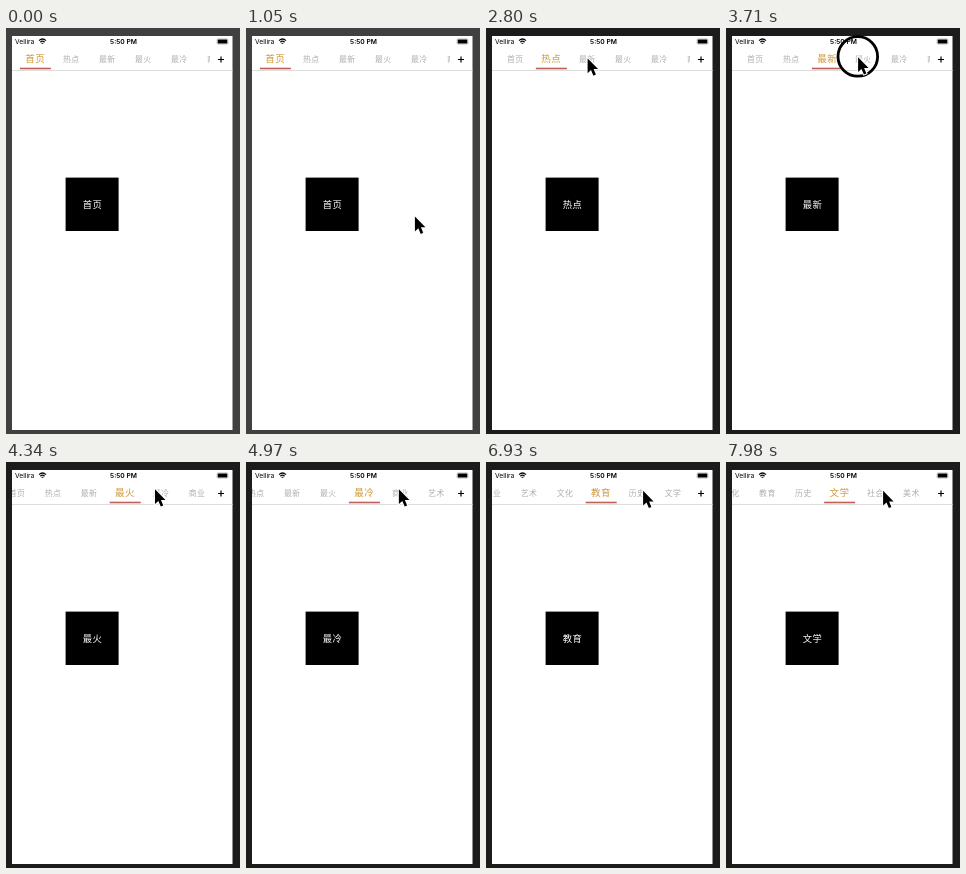
An HTML page that plays this animation: 234x406 px, repeating every 8000 ms.

```html
<!DOCTYPE html>
<html lang="zh-CN">
<head>
<meta charset="utf-8">
<title>Tab bar</title>
<style>
html, body { margin: 0; width: 100%; height: 100%; overflow: hidden; }
svg { display: block; }
text { font-family: "Noto Sans CJK SC", "Noto Sans CJK", sans-serif; text-anchor: middle; letter-spacing: .4px; }
.status { font-family: Inter, sans-serif; font-size: 6.7px; letter-spacing: 0; }
</style>
</head>
<body>
<svg width="234" height="406" viewBox="0 0 234 406">
  <defs><clipPath id="strip"><rect x="6" y="20" width="198" height="22"/></clipPath></defs>
  <rect id="back" width="234" height="406"/>
  <rect x="6" y="8" width="220.5" height="394" fill="#fff"/>

  <text class="status" x="9" y="16" style="text-anchor:start">Vellira</text>
  <text class="status" x="117.5" y="16" font-weight="600">5:50 PM</text>
  <g fill="none" stroke="#000" stroke-width="1.2">
    <path d="M33 12.6Q36.5 9.4 40 12.6M34.4 14.2Q36.5 12.2 38.6 14.2"/>
    <path d="M35.6 15.2h1.8l-.9.9z" fill="#000" stroke-width=".4"/>
  </g>
  <rect x="211" y="10.8" width="11" height="5.4" rx="1.2" fill="none" stroke="#999" stroke-width=".5"/>
  <rect x="211.7" y="11.5" width="9.6" height="4" rx=".6"/>

  <g clip-path="url(#strip)">
    <g id="tabs"><rect id="line" y="39.7" width="31" height="1.6" fill="#bd6157"/></g>
  </g>
  <path d="M212 31.5h6M215 28.5v6" stroke="#000" stroke-width="1.2"/>
  <path d="M6 42.5h220.5" stroke="#ddd"/>

  <rect x="59.6" y="149.6" width="53" height="53.4"/>
  <text id="page" x="86.4" y="179.7" font-size="9.3" fill="#fff"></text>

  <g id="cursor">
    <circle id="ring" cx=".3" cy=".6" r="19.8" fill="none" stroke="#000" stroke-width="2.8"/>
    <path d="M.6 1.4v14.8l3.4-3.1l2.4 5.6l2.5-1.1l-2.3-5.5h4.5z" stroke="#fff" stroke-width="2" paint-order="stroke"/>
  </g>
</svg>
<script>
const LOOP = 8000, STEP = 70, MOVE = 280, HOLD = 140, DELAY = 60, SLIDE = 220;
const names = '首页 热点 最新 最火 最冷 商业 艺术 文化 教育 历史 文学 社会 美术'.split(' ');
// each click opens the next tab
const clicks = [2310, 2960, 3710, 4480, 5180, 5670, 6160, 6650, 7140, 7630];
// cursor stops: arrival time, x, y
const stops = [
  [350, 122, 303], [700, 170, 226], [1120, 168, 180], [1400, 158, 179], [1960, 75, 22],
  [2240, 64.8, 28.5], [2800, 101, 29], [3570, 131.5, 27.8], [4410, 151.5, 25.5], [5180, 156.5, 27.3]
];

const $ = id => document.getElementById(id);
const set = (el, attrs) => { for (const k in attrs) el.setAttribute(k, attrs[k]); };
const mix = (a, b, p) => a + (b - a) * p;
const ease = (t, start, end) => {
  const p = Math.min(1, Math.max(0, (t - start) / (end - start)));
  return p * p * (3 - 2 * p);
};
const tabX = i => 29 + 36 * i;
const scrollAt = i => Math.max(0, 36.8 * i - 92.2);

const tabs = names.map((name, i) => {
  const el = document.createElementNS('http://www.w3.org/2000/svg', 'text');
  el.textContent = name;
  set(el, { x: tabX(i) + .2 });
  $('tabs').append(el);
  return el;
});

const cursorAt = t => stops.reduce(([x, y], [at, nx, ny]) => {
  const p = ease(t, at - MOVE, at);
  return [mix(x, nx, p), mix(y, ny, p)];
}, stops[0].slice(1));

function draw(t) {
  const now = clicks.filter(c => t >= c + DELAY).length;
  const prev = Math.max(0, now - 1);
  const start = now ? clicks[now - 1] + DELAY : -SLIDE;
  const p = ease(t, start, start + SLIDE);

  set($('back'), { fill: t < clicks[0] ? '#404040' : '#1c1c1c' });
  set($('tabs'), { transform: `translate(${-mix(scrollAt(prev), scrollAt(now), p)} 0)` });
  set($('line'), { x: mix(tabX(prev), tabX(now), p) - 15.1 });
  $('page').textContent = names[now];

  tabs.forEach((el, i) => {
    const on = i === now ? p : i === prev ? 1 - p : 0;
    const rgb = [mix(174, 208, on), mix(174, 152, on), mix(174, 60, on)].map(Math.round);
    set(el, { 'font-size': mix(7.9, 9.5, on), y: mix(33.5, 34.4, on), fill: `rgb(${rgb})` });
  });

  set($('cursor'), {
    visibility: t < stops[0][0] ? 'hidden' : 'visible',
    transform: `translate(${cursorAt(t)})`
  });
  // the first two clicks are too quick to show a ring
  const ringed = clicks.slice(2).some(c => t >= c && t < c + HOLD);
  set($('ring'), { opacity: ringed ? 1 : 0 });
}

const begin = performance.now();
function tick() {
  const t = (performance.now() - begin) % LOOP;
  draw(Math.floor(t / STEP) * STEP);
  requestAnimationFrame(tick);
}
tick();
</script>
</body>
</html>
```
